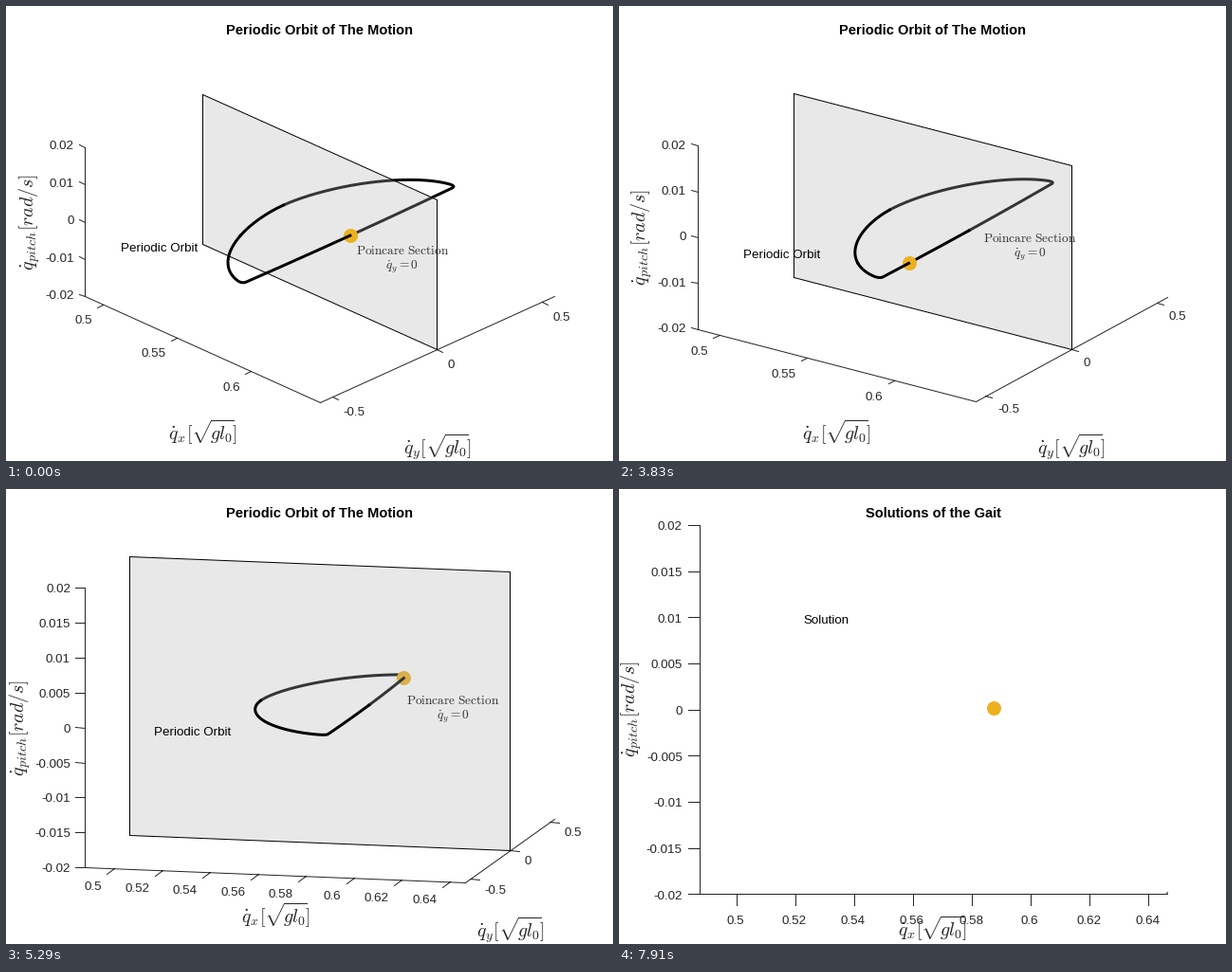
Animation of 640 by 480 pixels, one loop 8000 ms. Source, as a matplotlib script:

```python
import numpy as np
import matplotlib.pyplot as plt
from matplotlib.animation import FuncAnimation

plt.rcParams["font.family"] = "Liberation Sans"
plt.rcParams["mathtext.fontset"] = "cm"

PT = 0.72                      # points per pixel at 100 dpi
STEP, FRAMES = 20, 400         # ms per frame, frames per loop
PERIOD = 154                   # steps for one trip around the orbit
ARC_MID, ARC_HALF = 77, 25.4   # steps: middle and half length of the arc
AMP = 0.455                    # half length of the straight stretch
Y_SPAN = 1.12
INK = "0.15"
GOLD = "#EDB120"

fig = plt.figure(figsize=(6.4, 4.8), dpi=100, facecolor="white")
ax = fig.add_axes([0, 0, 1, 1])
ax.set_xlim(-0.5, 639.5)
ax.set_ylim(479.5, -0.5)
ax.axis("off")


def path(step):
    """Straight stretch joined to a superellipse arc."""
    step = step % PERIOD
    s = np.clip((step - ARC_MID) / ARC_HALF, -1, 1)
    sine = np.sin(np.pi / 2 * s)
    rate = AMP / (ARC_MID - ARC_HALF)
    line = np.where(step < ARC_MID, -rate * step, rate * (PERIOD - step))
    on_arc = np.abs(s) < 1
    v = np.where(on_arc, AMP * sine, line)
    bulge = np.clip(1 - np.abs(sine) ** 1.79, 0, 1) ** (1 / 1.79)
    u = np.where(on_arc, 0.124 - 0.282 * bulge,
                 0.124 + 0.005 * (1 - (v / AMP) ** 2))
    return np.array([u, v])


def orbit(step):
    """Box coordinates (-0.5..0.5) at a step, with rounded tips."""
    step = np.asarray(step, float)
    u, v = sum(path(step + d) for d in (-1.5, -0.5, 0.5, 1.5)) / 4
    return u, v, 0.002 + 0.004 * v / AMP


CURVE = orbit(np.linspace(0, PERIOD, 1801))


class View:
    """Orthographic view stretched to fill the axes area."""

    def __init__(self, turn):
        self.flat = turn >= PERIOD - 1
        self.angle = a = np.radians(45 * (1 - turn / (PERIOD - 1)))
        s, c = np.sin(a), np.cos(a)
        if self.flat:
            self.mid = np.array([330.7, 231.8])
            self.ex, self.ey = np.array([493, 0]), np.zeros(2)
            self.ez = np.array([0, -389.3])
        else:
            top, bottom = 37, 418 - turn / 36
            w = 495 / (s + c)
            h = (bottom - top) / (s * s + c * s + c)
            self.mid = np.array([330.6, (top + bottom) / 2])
            self.ex = np.array([w * c, h * s * s])
            self.ey = np.array([w * s, -h * c * s])
            self.ez = np.array([0, -h * c])

    def __call__(self, u, v, w):
        return (self.mid[:, None] + np.outer(self.ex, u)
                + np.outer(self.ey, v) + np.outer(self.ez, w))

    def at(self, u, v, w):
        return self.mid + self.ex * u + self.ey * v + self.ez * w

    def depth(self, u, v):
        return np.sin(self.angle) * u - np.cos(self.angle) * v


def label(x, y, s, px=13.33, ha="center", color=INK, **kw):
    """Text whose capitals are centred on y."""
    ax.text(x - 0.5, y + 0.36 * px, s, fontsize=px * PT, ha=ha, va="baseline",
            color=color, zorder=10, **kw)


def math_label(x, y, s, rotation=0):
    ax.text(x, y, s, fontsize=20 * PT, ha="center", va="baseline", color=INK,
            rotation=rotation, rotation_mode="anchor", zorder=10)


def strokes(segments, color=INK):
    """One-pixel lines with their ends on whole pixels."""
    xs, ys = [], []
    for p, q in segments:
        xs += [p[0], q[0], np.nan]
        ys += [p[1], q[1], np.nan]
    ax.plot(np.round(xs), np.round(ys), color=color, lw=PT, zorder=4.5)


def ticks(start, stop, step):
    n = int(round((stop - start) / step))
    return [round(start + k * step, 4) for k in range(n + 1)]


def unit(vec):
    return vec / np.hypot(*vec)


def rate_name(axis):
    return rf"$\dot{{q}}_{axis}[\sqrt{{\!gl_0\!}}]$"


def draw_axes(view, turn):
    flat = view.flat
    fine_x, fine_z = turn >= 54, turn >= 90
    size = 0.024 * np.hypot(*view.ex)
    out_z = -unit(view.ex) * size
    out_x = np.array([0, size]) if flat else -unit(view.ey) * size
    corner = view.at(-0.5, -0.5, -0.5)
    near = view.at(0.5, -0.5, -0.5)
    lines = [(corner, near), (corner, view.at(-0.5, -0.5, 0.5))]

    for x in ticks(0.5, 0.64, 0.02) if fine_x else ticks(0.5, 0.6, 0.05):
        p = view.at((x - 0.567) / 0.1587, -0.5, -0.5)
        q = p + out_x
        lines.append((p, q))
        if flat:
            label(q[0], q[1] + 15.5, f"{x:g}")
        else:
            label(q[0] - 5.5, q[1] + 12.2, f"{x:g}", ha="right")

    for z in ticks(-0.02, 0.02, 0.005 if fine_z else 0.01):
        p = view.at(-0.5, -0.5, z / 0.04)
        q = p + out_z
        lines.append((p, q))
        label(q[0] - 5.5, q[1] + flat, f"{z:g}", ha="right")

    if not flat:
        lines.append((near, view.at(0.5, 0.5, -0.5)))
        for y in (-0.5, 0, 0.5):
            p = view.at(0.5, y / Y_SPAN, -0.5)
            q = p - out_z
            lines.append((p, q))
            label(q[0] + 5.5, q[1] + 12 - 2.5 * turn / 108, f"{y:g}", ha="left")
        math_label(near[0] + view.ey[0] / 2, 472, rate_name("y"))

    strokes(lines)
    math_label(330 if flat else (corner[0] + near[0]) / 2, 471 if flat else 457,
               rate_name("x"))
    zx = 12 if flat else 24.5 - 0.03 * turn - 7.5 * fine_z
    math_label(zx + 5, view.at(-0.5, -0.5, 0)[1],
               r"$\dot{q}_{pitch}[rad/s]$", rotation=90)


def draw_ball(pos, z):
    ax.plot(*[[c] for c in pos], "o", ms=15 * PT, mew=0, color=GOLD, zorder=z)


def draw_orbit(view, step):
    u, v, w = CURVE
    bu, bv, bw = (float(c) for c in orbit(step))
    xs, ys = view(u, v, w)
    near = view.depth(u, v) > view.depth(bu, bv)
    behind = v > 0
    # layers 1-3 lie behind the plane (4), layers 5-7 in front of it
    for back, base in ((True, 1), (False, 5)):
        for close in (False, True):
            keep = (behind == back) & (near == close)
            ax.plot(np.where(keep, xs, np.nan), np.where(keep, ys, np.nan),
                    color="black", lw=3 * PT, zorder=base + 2 * close)
    draw_ball(view.at(bu, bv, bw), 2 if bv > 1e-6 else 6)

    edge = np.round(view(np.array([-0.5, 0.5, 0.5, -0.5]), np.zeros(4),
                         np.array([-0.5, -0.5, 0.5, 0.5])))
    ax.fill(*edge, color="0.7", alpha=0.3, lw=0, zorder=4)
    corners = list(edge.T)
    strokes(zip(corners, corners[1:] + corners[:1]), "black")


def draw_notes(view):
    x, y = view.at(-0.228, -0.4545, 0)
    label(x, y + 1.3, "Periodic Orbit", color="black")
    x, y = view.at(0.352, 0, 0)
    tone = "black" if view.flat else "0.2"
    label(x, y - 10.2, r"$\mathrm{Poincare\ Section}$", color=tone)
    label(x, y + 5.6, r"$\dot{q}_y=0$", color=tone)


def update(k):
    for artist in [*ax.lines, *ax.patches, *ax.texts]:
        artist.remove()
    t = k * STEP + STEP // 2
    step = min(max(k - 2, 0), 2 * PERIOD - 1)
    turn = max(step - PERIOD, 0)
    view = View(turn)
    draw_axes(view, turn)
    if t < 7210:
        draw_orbit(view, step)
        draw_notes(view)
        if view.flat:
            strokes([((331, 427), (577, 427))], "black")
    else:
        draw_ball(view.at(*orbit(step)), 6)
        label(218.5, 136.5, "Solution", color="black")
        strokes([((577, 426), (578, 425))])
    title = "Solutions of the Gait" if t >= 7910 else "Periodic Orbit of The Motion"
    label(330.8 + view.flat, 24, title, 14.67, color="black", weight="bold")
    return []


anim = FuncAnimation(fig, update, frames=FRAMES, interval=STEP,
                     init_func=lambda: [], repeat=True, repeat_delay=0)
plt.show()
```
